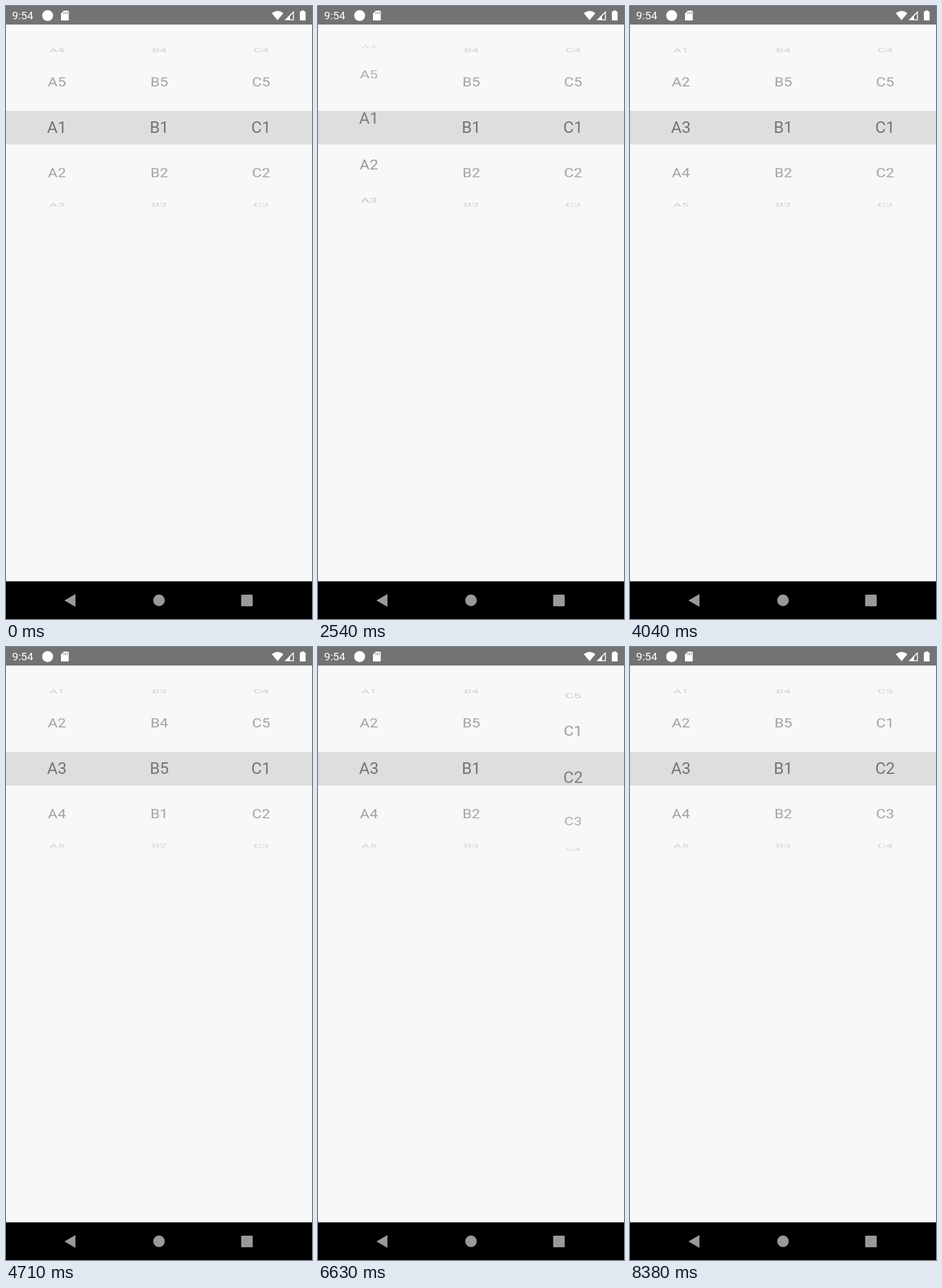
An HTML page for the animation above (8670 ms loop, 529x1058 px).

```html
<!DOCTYPE html>
<html lang="en">
<head>
<meta charset="utf-8">
<title>Wheel pickers</title>
<style>
  html, body { margin: 0; width: 100%; height: 100%; overflow: hidden; background: #f8f8fa; }
  #stage { position: relative; width: 529px; height: 1058px; overflow: hidden; background: #f8f8fa; font-family: Roboto, sans-serif; }
  #band { position: absolute; top: 181px; width: 100%; height: 58px; background: #dededd; }
  svg { position: absolute; left: 0; top: 0; }
  .item {
    position: absolute; top: 190px; width: 80px; height: 40px; margin-left: -40px;
    font-size: 28px; line-height: 40px; text-align: center; color: #737373;
  }
</style>
</head>
<body>
<div id="stage">
  <div id="band"></div>
  <svg width="529" height="1058" viewBox="0 0 529 1058">
    <rect width="529" height="32" fill="#737375"/>
    <g fill="#fff">
      <text x="10.5" y="23.3" font-family="Roboto, sans-serif" font-size="19">9:54</text>
      <circle cx="72" cy="16.5" r="9.5"/>
      <path d="M100 8h7q1.500 0 1.500 1.500v14q0 1.500-1.500 1.500H96.500q-1.500 0-1.500-1.500V13z"/>
      <path d="M459.500 12.500Q469.500 4.500 479.500 12.500L469.500 24.500z"/>
      <path d="M481.500 24.500L497.500 8.500V24.500z"/>
      <path d="M510.500 9.500V7.800h5v1.700h1.500q1 0 1 1V24q0 1-1 1h-8q-1 0-1-1V10.500q0-1 1-1z"/>
    </g>
    <path d="M100 10.500v3M103 10.500v3M106 10.500v3" stroke="#737375" stroke-width="1.300"/>
    <path d="M491 17.500L496 12.500V23H491z" fill="#737375"/>
    <rect y="993" width="529" height="65"/>
    <g fill="#999">
      <path d="M101 1026L120 1015V1037z"/>
      <circle cx="264.500" cy="1025.800" r="10"/>
      <rect x="406.500" y="1016" width="20" height="20" rx="1.500"/>
    </g>
  </svg>
</div>
<script>
const LOOP = 8670, COUNT = 5, RADIUS = 149, STEP = 31.8, CAMERA = 290;

// Scroll position of each wheel as [ms, items] points
const wheels = [
  { name: 'A', x: 88.2, track: [[2380, 0], [2540, .19], [2900, 1], [3250, 1.75], [3560, 2]] },
  { name: 'B', x: 264.5, track: [[4040, 0], [4380, -.6], [4720, -1], [5060, -.4], [5340, -.03], [5520, 0]] },
  { name: 'C', x: 440.8, track: [[5920, 0], [6270, .3], [6630, .81], [7050, 1]] }
];

const stage = document.getElementById('stage');
for (const wheel of wheels) {
  wheel.items = Array.from({ length: COUNT }, (_, i) => {
    const el = document.createElement('div');
    el.className = 'item';
    el.textContent = wheel.name + (i + 1);
    el.style.left = wheel.x + 'px';
    stage.append(el);
    return el;
  });
}

const slope = (a, b) => (b[1] - a[1]) / (b[0] - a[0]);

// Tangent that never overshoots; zero at the ends and at turning points
function tangent(track, i) {
  if (i === 0 || i === track.length - 1) return 0;
  const a = slope(track[i - 1], track[i]), b = slope(track[i], track[i + 1]);
  return a * b <= 0 ? 0 : 2 * a * b / (a + b);
}

function scrollAt(track, time) {
  const last = track.length - 1;
  if (time <= track[0][0]) return track[0][1];
  if (time >= track[last][0]) return track[last][1];
  const i = track.findIndex(point => point[0] > time) - 1;
  const [t0, p0] = track[i], [t1, p1] = track[i + 1];
  const span = t1 - t0, u = (time - t0) / span, v = 1 - u;
  return p0 * v * v * (1 + 2 * u) + p1 * u * u * (3 - 2 * u)
    + span * u * v * (tangent(track, i) * v - tangent(track, i + 1) * u);
}

function place(el, offset) {
  const degrees = offset * STEP, angle = degrees * Math.PI / 180;
  const y = RADIUS * Math.sin(angle), depth = RADIUS * (1 - Math.cos(angle));
  el.style.opacity = Math.max(0, 1 - Math.abs(degrees) / 90);
  el.style.transform =
    `translateY(${y}px) perspective(${CAMERA}px) translateZ(${-depth}px) rotateX(${-degrees}deg)`;
}

function draw() {
  const time = performance.now() % LOOP;
  for (const { track, items } of wheels) {
    const scroll = scrollAt(track, time);
    items.forEach((el, i) => {
      const offset = i - scroll;
      place(el, offset - COUNT * Math.round(offset / COUNT));
    });
  }
  requestAnimationFrame(draw);
}
draw();
</script>
</body>
</html>
```
